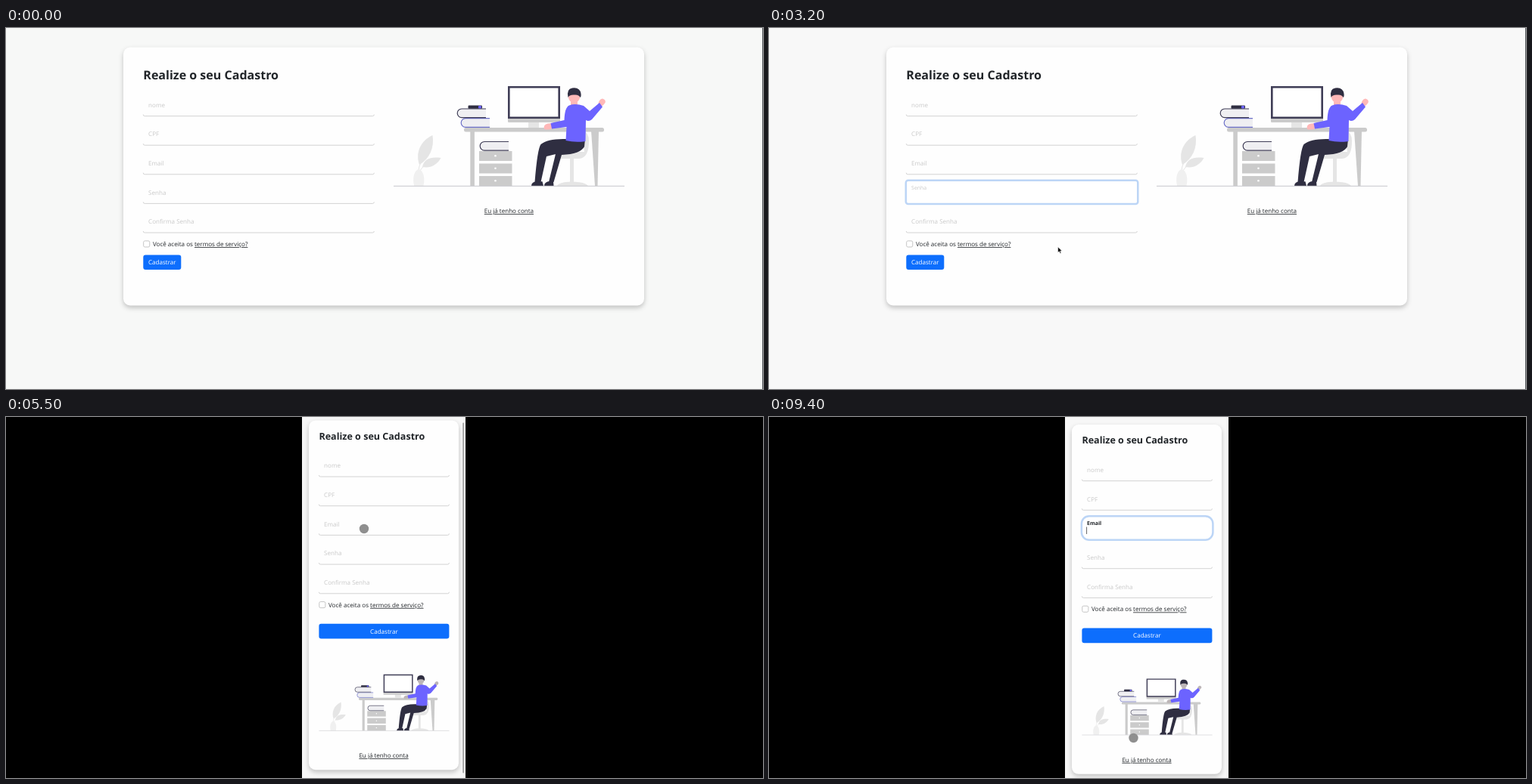
These frames come from a looping animation (1000x478 px, 9.9 s). An HTML page:

```html
<!DOCTYPE html>
<html lang="pt">
<head>
<meta charset="utf-8">
<title>Cadastro</title>
<style>
  html, body { margin: 0; width: 100%; height: 100%; overflow: hidden; background: #f8f8f8; }
  #stage { display: block; width: 100vw; height: 100vh; }
  text { font-family: "Open Sans", "Noto Sans", sans-serif; fill: #212529; text-rendering: geometricPrecision; }
  .bold { font-weight: 700; }
  .link { text-decoration: underline; }
  .hint { fill: #c9c9c9; }
  .card { fill: #fefefe; filter: drop-shadow(0 3px 3px rgba(0, 0, 0, .22)); }
  .rule { fill: none; stroke: #d3d3d3; }
  .ring { fill: #fff; stroke: #bcd5f6; stroke-width: 2.5; }
  .box { fill: #fff; stroke: #bfbfbf; stroke-width: .9; }
  .button { fill: #0d6efd; }
  .caret { stroke: #555; stroke-width: .9; }
  .skin { fill: var(--skin); }
  .dark { fill: #2f2e41; }
  .shirt { fill: #6c63ff; }
  .grey { fill: #cbcbcb; }
  .pale { fill: #e5e5e5; }
</style>
</head>
<body>
<svg id="stage" viewBox="0 0 1000 478" preserveAspectRatio="none"></svg>
<script>
const DURATION = 9900;
const STEP = 100;
const FIELDS = ["nome", "CPF", "Email", "Senha", "Confirma Senha"];
const stage = document.getElementById("stage");

const rect = (x, y, w, h, cls, r = 0) =>
  `<rect x="${x}" y="${y}" width="${w}" height="${h}" rx="${r}" class="${cls}"/>`;
const shape = (cls, d) => `<path class="${cls}" d="${d}"/>`;
const text = (x, y, size, content, cls = "", anchor = "start") =>
  `<text x="${x}" y="${y}" font-size="${size}" class="${cls}" text-anchor="${anchor}">${content}</text>`;

// Eased position along [time, x, y] points.
function along(points, t) {
  const next = points.findIndex(p => p[0] > t);
  if (next === 0) return points[0].slice(1);
  if (next < 0) return points.at(-1).slice(1);
  const [t0, x0, y0] = points[next - 1], [t1, x1, y1] = points[next];
  const u = (t - t0) / (t1 - t0), k = u * u * (3 - 2 * u);
  return [x0 + (x1 - x0) * k, y0 + (y1 - y0) * k];
}

const book = (x, y, color) =>
  `<path d="M${x + 38} ${y}H${x + 6}a5.8 5.8 0 0 0 0 11.6H${x + 38}" fill="#efeff2" stroke="${color}" stroke-width="1.2"/>`;

const drawer = y => rect(625, y, 43.5, 13, "grey") + `<circle cx="646.5" cy="${y + 6.3}" r="1.3" fill="#fff"/>`;

const plant =
  shape("pale", "M546 181C541 167 546 150 563.5 142C566 158 560 173 546 181Z") +
  shape("pale", "M550 184C552 174 560 170 574.5 172C569 182 560 186 550 184Z") +
  `<path d="M545 190Q545 184 548 178M546 191Q548 186 553 182" fill="none" stroke="#e5e5e5"/>` +
  `<path d="M539 209Q536.500 197 541 190Q545.500 184 549.500 190Q554 197 551.500 209Z" fill="#f0f0f0"/>`;

const chair =
  shape("pale", "M760 136Q770 136 770 150Q770 172 757 173H731Q725 172 724 164H764Z") +
  rect(745, 172, 5, 33, "pale") +
  shape("pale", "M728 209Q730 204 747 203.500Q766 204 769 209Z");

const desk =
  rect(613.3, 136, 5.6, 73, "grey") + shape("grey", "M773 136h10l-1.500 73h-3.500z") +
  rect(605, 132, 185, 5.6, "grey", 2.5) + [163, 179.5, 196].map(drawer).join("") +
  book(626, 150.5, "#3f3d56") + book(601, 119.7, "#6c70c8") + book(596, 107, "#3f3d56") +
  rect(610.5, 102.6, 18.5, 4.2, "dark", 1.2) + rect(624, 103, 4, 3.4, "shirt", 1);

const monitor =
  rect(690, 124, 14, 8, "pale") + rect(663, 118, 69, 7, "grey", 1) +
  `<path d="M664.300 78.300h66.400v40.500h-66.400z" fill="#fff" stroke="#3f3d56" stroke-width="2.600"/>`;

const person =
  shape("skin", "M711 134Q709 128 716 126.500L722 126V133Q716 135.500 711 134Z") +
  shape("skin", "M782 102Q783 94 788 93.500Q793 95 791.500 99Q789 103 786 104Z") +
  rect(746, 96, 9, 9, "skin", 3) +
  shape("dark", "M741 147Q716 146 706.500 154Q702 160 698.500 204H706.500L714 170L726 167L717 204H723.500L734 168Q759 167 764 157L765 147Z") +
  shape("dark", "M694 209Q694 204 701 203.300H708.500L710 209ZM711 209Q711 205 716 203.300H723L723.500 209Z") +
  shape("shirt", "M744 102.500Q752 99.500 763 103L771 110L784 99L788 104.500L774 121Q770 124.500 766 122L765.500 150Q752 152 739.500 149L740.500 131L721 133.500L719.500 126L737.500 122Q738 105 744 102.500Z") +
  `<circle class="skin" cx="750.500" cy="91.500" r="7.600"/>` +
  shape("dark", "M742.500 92Q740 81 748 79.500Q758 78 759.500 87Q760 91 758.500 92Q757 88 751 88.500Q744 88 742.500 92Z");

const picture =
  plant + chair + desk + monitor + person +
  `<path d="M512 209.300H817" stroke="#c6c6cc" stroke-width="1"/>`;

const illustration = (transform, skin) => `<g transform="${transform}" style="--skin:${skin}">${picture}</g>`;

function field(form, index, focused, caret, faint) {
  const { x, w, size, inset } = form, y = form.first + index * form.gap;
  if (focused)
    return rect(x - .5, y - 30.7, w + 1.5, 31.4, "ring", form.ringRadius) +
      text(x + inset, y - 18.6, size * .86, FIELDS[index], faint ? "hint" : "bold") +
      (caret ? shape("caret", `M${x + inset - .5} ${y - 16.5}v9.500`) : "");
  return shape("rule", `M${x} ${y - 2}q0 2 2 2H${x + w - 2}q2 0 2 -2`) +
    text(x + inset, y - 1.45 * size, size, FIELDS[index], "hint");
}

function formView(form, focus = -1, caret = false, faint = false) {
  const { x, size, checkY, button, titleY } = form;
  const side = size, termsX = x + 1.56 * size, termsY = checkY + size * .9;
  const link = (s) => `<tspan class="link">${s}</tspan>`;
  const title = form.narrow ? ["Realize o seu", "Cadastro"] : ["Realize o seu Cadastro"];
  const terms = form.narrow
    ? text(termsX, termsY, size, `Você aceita os ${link("termos de")}`) +
      text(termsX, termsY + 17, size, link("serviço?"))
    : text(termsX, termsY, size, `Você aceita os ${link("termos de serviço?")}`);
  const [bw, by, bh] = button;
  return title.map((s, i) => text(x, titleY + 20 * i, form.titleSize, s, "bold")).join("") +
    FIELDS.map((_, i) => field(form, i, i === focus, caret, faint)).join("") +
    rect(x + .4, checkY, side, side, "box", 1.8) + terms +
    rect(x, by, bw, bh, "button", 3) +
    `<g style="--ink:#fff"><text x="${x + bw / 2}" y="${by + bh / 2 + size * .35}" font-size="${size}" text-anchor="middle" style="fill:#fff">Cadastrar</text></g>`;
}

const WIDE = { x: 181.3, w: 305, size: 8.07, inset: 6.8, first: 116.6, gap: 38.6, titleY: 67.8, titleSize: 16.05,
  checkY: 281.9, button: [50, 300.5, 19.6], ringRadius: 3 };
const ZOOMED = { x: 418, w: 162.5, size: 10.75, inset: 9, first: 132.6, gap: 51.6, titleY: 46, titleSize: 16.1,
  checkY: 353.3, button: [162.5, 396, 26], narrow: true };
const PHONE = { x: 413.4, w: 172, size: 8.07, inset: 6.7, first: 84.6, gap: 38.7, titleY: 35.3, titleSize: 12.55,
  checkY: 250.2, button: [172, 279.4, 19.8], ringRadius: 10 };

const arrow = (x, y, scale = 1) =>
  `<path transform="translate(${x} ${y}) scale(${scale})" d="M0 0V7.300L1.700 5.800L3 8.500L4.200 8L3 5.300H5.300Z" fill="#000" stroke="#fff" stroke-width=".5"/>`;
const beam = (x, y) =>
  `<path d="M${x - 1.6} ${y - 4}h3.200M${x} ${y - 4}v8M${x - 1.6} ${y + 4}h3.200" fill="none" stroke="#666" stroke-width=".8"/>`;

function desktop(t) {
  const focused = t >= 1800;
  const [x, y] = along([[1600, 437, 207], [2100, 415, 220], [2900, 415, 220], [3200, 381.7, 290]], t);
  const pointer = t < 1600 ? "" : t < 3000 ? beam(x, y) : arrow(x, y);
  return rect(0, 0, 1000, 478, "") .replace("<rect", `<rect fill="${focused ? "#f8f8f8" : "#f7f8f7"}"`) +
    `<path d="M999.500 0V478" stroke="#55585c"/>` +
    rect(155, 25.5, 688, 342, "card", 9) +
    formView(WIDE, focused ? 3 : -1, t < 2400, true) +
    illustration("", "#ffb8b8") +
    text(664.4, 245, 8.05, "Eu já tenho conta", "link", "middle") + pointer;
}

const phoneFrame = content =>
  `<rect width="1000" height="478" fill="#000"/><svg x="391" width="216" height="478" viewBox="391 0 216 478">
   <rect x="391" width="216" height="478" fill="#f7f7f7"/>${content}</svg>`;

function zoomedPhone(t) {
  const [x, y] = along([[3300, 558.7, 342], [3500, 548, 326]], t);
  return phoneFrame(rect(400, 13.5, 198, 500, "card", 12) + formView(ZOOMED) + arrow(x, y, 1.25));
}

const TOUCH = [[3700, 545, 300], [3900, 540, 290], [4400, 473, 165], [5000, 473, 158], [5200, 473, 148],
  [5500, 473, 148], [5800, 473, 156], [6100, 472, 150], [6300, 470, 112], [6400, 470, 112],
  [6700, 474, 156], [6900, 474, 152], [7000, 474, 152], [7400, 481.5, 425]];
const SCROLL = [[4900, 0, 0], [5200, 0, 5.6], [5500, 0, 5.6], [5800, 0, 0]];

function phone(t) {
  const [x, y] = along(TOUCH, t);
  const scroll = along(SCROLL, t)[1];
  const focus = t >= 7000 ? 2 : t >= 6300 ? 1 : -1;
  const caret = Math.floor((t - (focus === 2 ? 7000 : 6300)) / 600) % 2 === 0;
  const barOpacity = t < 5000 ? (4400 - t) / 500 : (6500 - t) / 400;
  return phoneFrame(
    `<g transform="translate(0 ${-scroll})">` +
    rect(400, 10, 198, 462.8, "card", 9) + formView(PHONE, focus, caret) +
    illustration("translate(413.500 421) scale(.564) translate(-512 -209.300)", "#bdb6b8") +
    text(499, 456.8, 8.05, "Eu já tenho conta", "link", "middle") + "</g>" +
    `<rect x="603.200" y="${2 + scroll}" width="2" height="464" rx="1" fill="#a5a5a5" opacity="${Math.min(1, Math.max(0, barOpacity))}"/>` +
    `<circle cx="${x}" cy="${y}" r="6.200" fill="#8f8f8f"/>`);
}

let shown = -1;
function tick(now) {
  const t = Math.floor((now % DURATION) / STEP) * STEP;
  if (t !== shown) {
    stage.innerHTML = t < 3300 ? desktop(t) : t < 3700 ? zoomedPhone(t) : phone(t);
    shown = t;
  }
  requestAnimationFrame(tick);
}
tick(performance.now());
</script>
</body>
</html>
```
